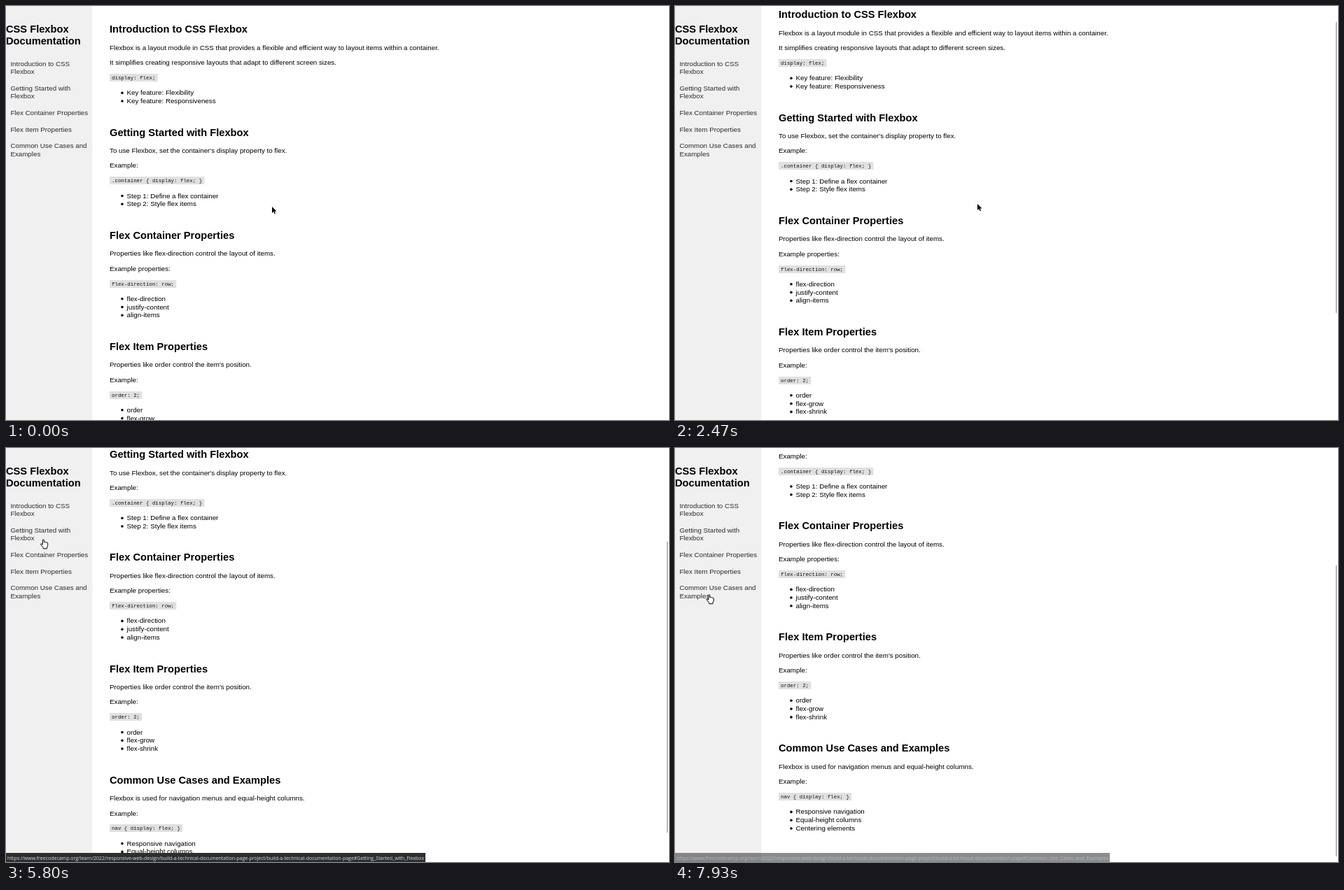
An HTML page with a canvas for the animation above (8 s loop, 947 by 592 pixels).

```html
<!DOCTYPE html>
<html lang="en">
<head>
<meta charset="utf-8">
<title>CSS Flexbox Documentation</title>
<style>
  html, body { margin: 0; width: 100%; height: 100%; overflow: hidden; background: #fff; }
  canvas { display: block; }
</style>
</head>
<body>
<canvas id="stage" width="947" height="592"></canvas>
<script>
const ctx = document.getElementById('stage').getContext('2d');
const W = 947, H = 592, LOOP = 8000, FRAME = 1000 / 15;
const ZOOM = 0.6105;                 // page pixels to stage pixels
const SANS = '"Liberation Sans", Arial, sans-serif';
const BODY = '16px ' + SANS, HEAD = 'bold 24px ' + SANS;
const CODE = '100px "Liberation Mono", monospace', CODE_ZOOM = 0.0742;
const STATUS = '100px "Open Sans", "Noto Sans", sans-serif', STATUS_ZOOM = 0.0699;
const BASE = 'https://www.freecodecamp.org/learn/2022/responsive-web-design/' +
  'build-a-technical-documentation-page-project/build-a-technical-documentation-page#';

const sections = [
  { y: 33, title: 'Introduction to CSS Flexbox',
    text: ['Flexbox is a layout module in CSS that provides a flexible and efficient way to layout items within a container.',
           'It simplifies creating responsive layouts that adapt to different screen sizes.'],
    code: 'display: flex;', list: ['Key feature: Flexibility', 'Key feature: Responsiveness'] },
  { y: 180.3, title: 'Getting Started with Flexbox',
    text: ["To use Flexbox, set the container's display property to flex.", 'Example:'],
    code: '.container { display: flex; }', list: ['Step 1: Define a flex container', 'Step 2: Style flex items'] },
  { y: 327.5, title: 'Flex Container Properties',
    text: ['Properties like flex-direction control the layout of items.', 'Example properties:'],
    code: 'flex-direction: row;', list: ['flex-direction', 'justify-content', 'align-items'] },
  { y: 486.6, title: 'Flex Item Properties',
    text: ["Properties like order control the item's position.", 'Example:'],
    code: 'order: 2;', list: ['order', 'flex-grow', 'flex-shrink'] },
  { y: 645.7, title: 'Common Use Cases and Examples',
    text: ['Flexbox is used for navigation menus and equal-height columns.', 'Example:'],
    code: 'nav { display: flex; }', list: ['Responsive navigation', 'Equal-height columns', 'Centering elements'] }
];

const links = [
  ['Introduction to CSS', 82.6], ['Flexbox', 93.9],
  ['Getting Started with', 117.6], ['Flexbox', 128.8],
  ['Flex Container Properties', 152.6], ['Flex Item Properties', 176.2],
  ['Common Use Cases and', 199.9], ['Examples', 211.2]
];

// Key lists: [time, value...]; two keys at one time make a jump.
const scrollKeys = [
  [0, 0], [866, 0], [866, 65.2], [1133, 65.2], [1133, 130.3], [1200, 165], [1266, 195],
  [1333, 210], [1400, 216.5], [1600, 216.5], [1600, 192], [2066, 192], [2066, 155],
  [2466, 21.2], [2533, 0], [3933, 0], [3933, 216.5], [5800, 216.5], [5800, 171.3],
  [6266, 171.3], [6266, 24], [7600, 24], [7600, 216.5]
];
const mouseKeys = [
  [0, 380, 287], [466, 436, 258], [733, 436, 258], [733, 436, 262], [2066, 436, 262],
  [2400, 432, 283], [2733, 432, 283], [2866, 430, 286], [3066, 270, 225], [3266, 100, 152],
  [3400, 57, 141], [3600, 55.5, 167], [3666, 54, 170], [3866, 44, 178], [4533, 44, 178],
  [4866, 45, 195], [5133, 46.5, 202], [5200, 47, 203], [5466, 48, 176], [5666, 51, 150],
  [5866, 54, 121], [6066, 55.5, 88.5], [6466, 55.5, 88.5], [6800, 52, 150],
  [7066, 48.5, 209.5]
];
const fadeKeys = [
  [0, 0], [4333, 0], [4533, 1], [6466, 1], [6666, 0], [7200, 0], [7266, 0.5], [7333, 1],
  [7866, 1], [7933, 0.55]
];
const hovers = [[0, 3], [4866, 4], [5400, 3], [5600, 2], [5733, 1], [5933, 0], [7000, 4]];

function at(keys, t) {
  let i = keys.length - 1;
  while (keys[i][0] > t) i--;
  const a = keys[i], b = keys[i + 1];
  if (!b) return a.slice(1);
  const k = (t - a[0]) / (b[0] - a[0]);
  return a.slice(1).map((v, n) => v + (b[n + 1] - v) * k);
}

function place(x, y, zoom) { ctx.setTransform(zoom, 0, 0, zoom, x, y); }
function reset() { ctx.setTransform(1, 0, 0, 1, 0, 0); }

function rect(x, y, w, h, color) {
  ctx.fillStyle = color;
  ctx.fillRect(x, y, w, h);
}

function write(str, x, y, font, color = '#000', zoom = ZOOM) {
  place(x, y, zoom);
  ctx.font = font;
  ctx.fillStyle = color;
  ctx.fillText(str, 0, 0);
  reset();
}

function widthOf(str, font, zoom) {
  ctx.font = font;
  return ctx.measureText(str).width * zoom;
}

function drawSection(s, scroll) {
  const y = s.y - scroll;
  write(s.title, 148, y + 5.2, HEAD);
  s.text.forEach((p, i) => write(p, 148, y + 29.8 + i * 21.3, BODY));
  rect(148, Math.round(y + 64), widthOf(s.code, CODE, CODE_ZOOM) + 6.2, 11, '#e0e0e0');
  write(s.code, 151, y + 72, CODE, '#111', CODE_ZOOM);
  s.list.forEach((item, i) => {
    const ly = y + 94.2 + i * 11.8;
    ctx.fillStyle = '#000';
    ctx.beginPath();
    ctx.arc(166, ly - 3, 1.8, 0, 7);
    ctx.fill();
    write(item, 172.5, ly, BODY);
  });
}

function drawNav() {
  rect(0, 0, 123.3, H, '#f0f0f0');
  write('CSS Flexbox', 0, 38.2, HEAD);
  write('Documentation', 0, 54.9, HEAD);
  for (const [label, y] of links) write(label, 6.4, y + 3.4, BODY, '#2c2c2c');
}

function drawStatus(t) {
  const alpha = at(fadeKeys, t)[0];
  if (!alpha) return;
  const hover = hovers.filter(h => h[0] <= t).pop()[1];
  const url = BASE + sections[hover].title.replace(/ /g, '_');
  ctx.globalAlpha = alpha;
  rect(0, 579, widthOf(url, STATUS, STATUS_ZOOM) + 4, 13, '#2d2e31');
  write(url, 2, 589, STATUS, '#dcdde0', STATUS_ZOOM);
  ctx.globalAlpha = 1;
}

const arrow = new Path2D('M0 0V16L4 12.5L6.5 18.5L9 17.5L6.5 11.5H11.5Z');
const hand = new Path2D('M5 13V1.5Q6.5 -.5 8 1.5V7Q9.5 5.5 11 7.2Q12.5 6 14 8Q15.6 7 17 9V14' +
  'Q17 17 15 19V22H6.5V19.5Q3 16 .5 12Q1 9.5 3 11Z');

function drawMouse(t) {
  const [x, y] = at(mouseKeys, t);
  const onLink = x < 118 && y > 71;
  if (onLink) place(x - 3.6, y, 0.6);
  else place(x, y, 0.56);
  ctx.lineJoin = 'round';
  ctx.lineWidth = 1.5;
  ctx.strokeStyle = onLink ? '#111' : '#fff';
  ctx.fillStyle = onLink ? '#fff' : '#000';
  const shape = onLink ? hand : arrow;
  ctx.stroke(shape);
  ctx.fill(shape);
  if (onLink) ctx.stroke(shape);
  reset();
}

function draw(t) {
  const scroll = at(scrollKeys, t)[0];
  rect(0, 0, W, H, '#fff');
  for (const s of sections) drawSection(s, scroll);
  drawNav();
  if (t >= 60) rect(944, Math.round(7 + scroll * 0.744), 1, 416, '#808080');
  drawStatus(t);
  drawMouse(t);
}

function tick(now) {
  const t = now % LOOP;
  draw(Math.floor((t + 4) / FRAME) * FRAME);
  requestAnimationFrame(tick);
}
draw(0);
requestAnimationFrame(tick);
</script>
</body>
</html>
```
